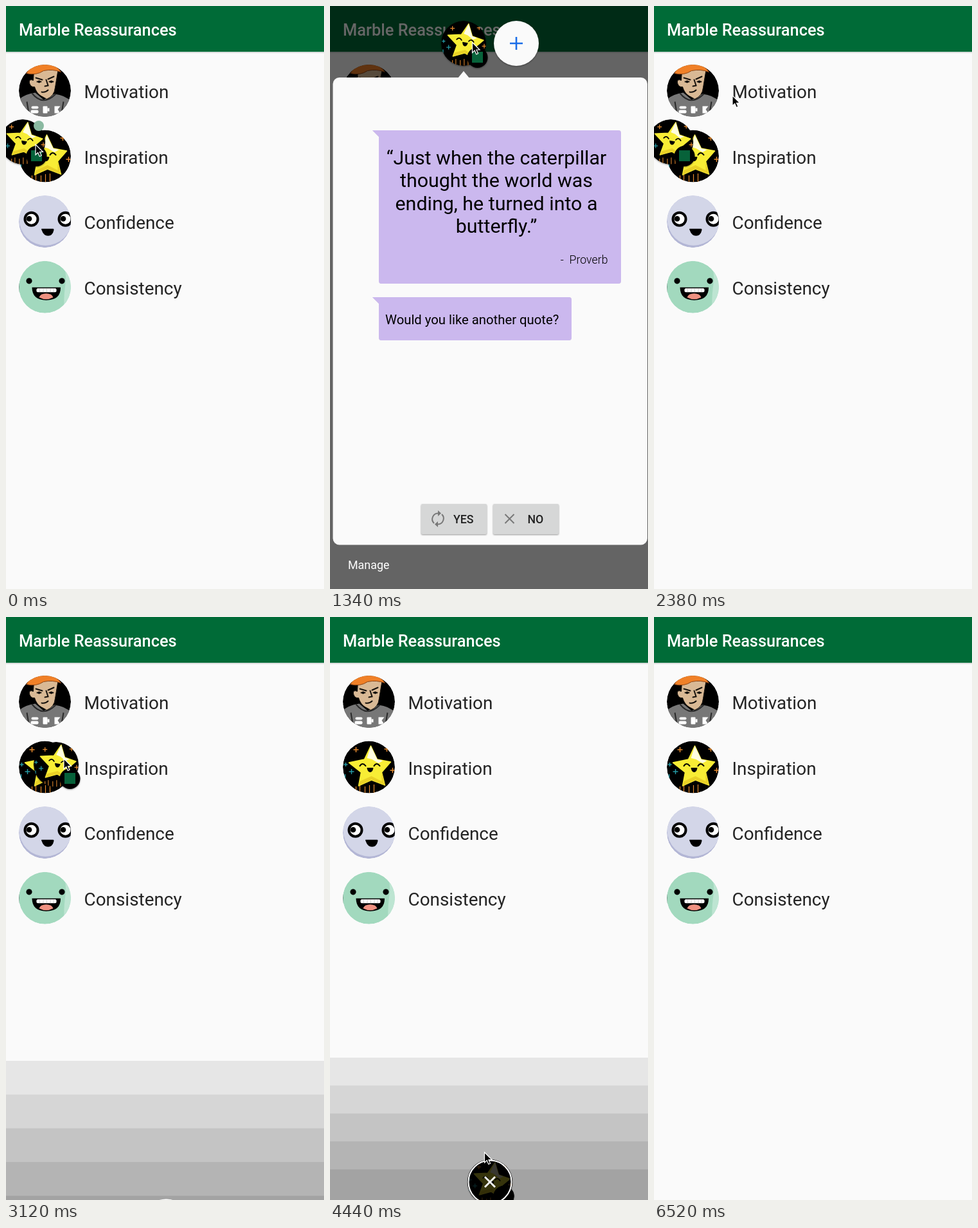
Animation of 495 by 905 pixels, one loop 7.12 s. Source, as an HTML page:

```html
<!DOCTYPE html>
<html lang="en">
<head>
<meta charset="utf-8">
<title>Quote bubbles</title>
<style>
  html, body { margin: 0; width: 100%; height: 100%; overflow: hidden; background: #fafafa; }
  svg { display: block; width: 100%; height: 100%; }
  text { font-family: Roboto, sans-serif; }
  .title { font-size: 25.4px; font-weight: 500; fill: #fff; }
  .item { font-size: 27.9px; fill: #242424; }
  .quote { font-size: 30.4px; text-anchor: middle; }
  .author { font-size: 17.75px; font-weight: 300; text-anchor: end; white-space: pre; }
  .ask { font-size: 20.3px; }
  .button { font-size: 17.75px; font-weight: 500; fill: #222; }
  .manage { font-size: 17.9px; fill: #fff; }
  .raised { filter: drop-shadow(0 1px 1px rgba(0, 0, 0, .4)); }
  .line { fill: none; stroke-width: 2; }
</style>
</head>
<body>
<svg viewBox="0 0 495 905" preserveAspectRatio="none">
  <defs>
    <clipPath id="round"><circle r="40.5"/></clipPath>

    <g id="sky">
      <circle r="40.5"/>
      <g class="line" stroke="#e58a2e" stroke-width="1.5">
        <path d="M-24-27h8m-4-4v8M24-28h8m-4-4v8M33 5h8m-4-4v8" style="stroke-width:1.5"/>
        <path d="M-20 30v8M-14 28v12M-6 30v10M1 28v12M8 27v13" style="stroke-width:1.2"/>
      </g>
      <path class="line" stroke="#259aa5" style="stroke-width:1.5" d="M-31 7h8m-4-4v8M-39-4h6m-3-3v6M-37 11v6"/>
    </g>

    <g id="star" stroke-linejoin="round">
      <path fill="#f8ed35" stroke="#f8ed35" stroke-width="1.5"
            d="M3-33 13-12 34-8 20 8 25 28 4 20-16 29-12 8-31-7-7-12Z"/>
      <path fill="#e9d126" d="M20 8 25 28 4 20-16 29-14 22 4 14 20 22Z"/>
      <path fill="#fffde0" d="M3-33 13-12 22-10 15-6 5-12-3-14Z"/>
      <path fill="none" stroke="#000" stroke-width="2" stroke-linecap="round"
            d="M-14-2q4-6 9 0M8-2q4-6 9 0"/>
      <path d="M-3 1h10q-1 7-5 7t-5-7Z"/>
    </g>

    <g id="starFace" clip-path="url(#round)"><use href="#sky"/><use href="#star"/></g>
    <g id="bubbleFace" clip-path="url(#round)">
      <use href="#sky"/><use href="#star" transform="translate(1 -3) rotate(9)"/>
    </g>

    <g id="capFace" clip-path="url(#round)">
      <circle r="40.5"/>
      <path fill="#777" d="M-41 14q10-9 26-11l13 11L15 5q17 2 26 12v25h-82Z"/>
      <path class="line" stroke="#292929" d="M-20 4Q-3 25 17 5M-28 17l4 24M29 17l-4 24"/>
      <path fill="#d9b995" stroke="#17120d" d="M-17-32-18-16q-7-3-6 4 2 7 8 6 3 10 10 14l9 5q12-5 13-18l5-30Z"/>
      <path fill="#f08027" stroke="#8a4517" d="M-29-27q9-17 27-15 20 0 27 13-13-5-27-2-12 8-27 4Z"/>
      <path class="line" stroke="#17120d" stroke-linecap="round"
            d="M-14-20l10 3M5-18l9-4M2-17l3 9-5 1M-5 2q6 1 10-3M-12-14h6M7-14h6"/>
      <circle cx="-9" cy="-14" r="2"/><circle cx="10" cy="-14" r="2"/>
      <g fill="#fff">
        <rect x="-21" y="24" width="11" height="4" rx="2"/><rect x="-22" y="30" width="12" height="5" rx="2"/>
        <rect x="-3" y="24" width="7" height="11" rx="1"/><path d="M4 27h3v5H4ZM15 24h9l-4 5 4 6h-9Z"/>
      </g>
    </g>

    <g id="moonFace" clip-path="url(#round)">
      <circle r="40.5" fill="#b3b6d5"/>
      <circle cx="1" cy="-4" r="41" fill="#d3d6e8"/>
      <g id="eye"><circle cx="-21" cy="-4" r="12"/><circle cx="-21" cy="-4" r="8" fill="#fff"/><circle cx="-24.5" cy="-4.5" r="4.3"/></g>
      <use href="#eye" x="53"/>
      <path d="M-5 11H13q1 0 1 2-2 9-9 9t-10-9q-1-2 0-2Z"/>
    </g>

    <g id="mintFace" clip-path="url(#round)">
      <circle r="40.5" fill="#a2d9be"/>
      <path fill="#bde5d2" d="M25-41Q35-25 32-5T30 41H42V-41Z"/>
      <path fill="#789f8e" d="M-41-6h1.5V8H-41Z"/>
      <circle cx="-24.500" cy="-9.500" r="4.6"/><circle cx="26.500" cy="-9.500" r="4.6"/>
      <path d="M-20 .5H24.500Q25 20 2 20.500-20 20-20 .5Z"/>
      <path fill="#ef9181" d="M-9 16q2-6 11-6t11 6q-11 6-22 0Z"/>
      <rect x="-13" y="2" width="31" height="6" rx="2" fill="#fff"/>
      <path stroke="#bbb" d="M-8 2v6M-2.500 2v6M3 2v6M8.500 2v6M13.500 2v6" stroke-width=".7"/>
    </g>
  </defs>

  <rect width="495" height="905" fill="#fafafa"/>
  <rect width="495" height="73" fill="#d9dcda"/>
  <rect width="495" height="71" fill="#006b37"/>
  <text class="title" x="20" y="45.500">Marble Reassurances</text>
  <g id="list"></g>
  <rect id="scrim" width="495" height="905"/>
  <g id="bands"></g>

  <g id="panel">
    <path fill="#fafafa" d="M199 112 208 101 217 112Z"/>
    <rect x="4.500" y="111" width="489.500" height="725.500" rx="10" fill="#fafafa"/>
    <text class="manage" x="28" y="874">Manage</text>
    <g id="content">
      <g fill="#cbb8ee" class="raised" style="filter:drop-shadow(0 .5px .5px rgba(0,0,0,.15))">
        <path d="M66 193H449q4 0 4 4V427q0 4-4 4H80q-4 0-4-4V203Z"/>
        <path d="M66 452H372q4 0 4 4V515q0 4-4 4H80q-4 0-4-4V462Z"/>
      </g>
      <g id="quote"></g>
      <text class="author" x="432.500" y="400">-  Proverb</text>
      <text class="ask" x="86" y="494">Would you like another quote?</text>
      <g fill="#d6d7d7" class="raised">
        <rect x="142" y="773" width="102" height="47" rx="2"/>
        <rect x="254" y="773" width="102" height="47" rx="2"/>
      </g>
      <g class="line" stroke="#777">
        <path d="M162 803A9 9 0 0 1 168 787.500h2M174 789A9 9 0 0 1 168 804.500h-2"/>
        <path d="M272.500 789l14 14m0-14l-14 14"/>
      </g>
      <path fill="#777" d="M168 783v9l5-4.500ZM168 800v9l-5-4.500Z"/>
      <text class="button" x="192" y="802.500">YES</text>
      <text class="button" x="307.500" y="802.500">NO</text>
    </g>
  </g>

  <g id="plus" class="raised">
    <circle r="35" fill="#fafafa"/>
    <path d="M-10 0H10M0-10V10" stroke="#1a6de8" stroke-width="2.6"/>
  </g>
  <g id="bubble">
    <g class="raised">
      <use href="#bubbleFace" transform="scale(.865)"/>
      <circle cx="21.500" cy="22" r="16"/>
    </g>
    <rect x="13" y="13" width="17" height="17" fill="#07623a"/>
    <circle id="dot" cx="25" cy="-25" r="8" fill="#8ab9a1"/>
    <g id="dim"><circle r="35" opacity=".78"/><circle cx="21.500" cy="22" r="16"/></g>
  </g>
  <g id="target" fill="none" stroke="#fff">
    <circle r="33.500" stroke-width="2"/>
    <path d="M-8-8 8 8M8-8-8 8" stroke-width="2.800"/>
  </g>
  <path id="cursor" stroke="#fff" stroke-width="1.200" d="M0 0V16L3.700 12.500 6.300 18.500 9 17.300 6.500 11.500H11.500Z"/>
</svg>

<script>
const $ = id => document.getElementById(id);
const LOOP = 7120, STEPS = 48;

$('list').innerHTML = [['cap', 'Motivation'], ['star', 'Inspiration'], ['moon', 'Confidence'], ['mint', 'Consistency']]
  .map(([face, name], i) => `<use href="#${face}Face" transform="translate(60.5 ${131.5 + 101.6 * i})"/>
    <text class="item" x="121.500" y="${143 + 101.6 * i}">${name}</text>`).join('');

$('quote').innerHTML = ['“Just when the caterpillar', 'thought the world was', 'ending, he turned into a', 'butterfly.”']
  .map((line, i) => `<text class="quote" x="259" y="${245.5 + 35.6 * i}">${line}</text>`).join('');

$('bands').innerHTML = Array.from({ length: 5 }, (_, i) =>
  `<rect width="495" fill-opacity="${.08 + .067 * i}"/>`).join('');

// Each key is [step, ...values]; values are linear between keys.
const tracks = {
  bubble: [[0, 26, 211], [1, 26, 211], [2, 66, 160], [3, 180, 72], [4, 211, 56], [5, 208, 58], [12, 208, 58],
    [13, 178, 58], [14, 80, 135], [15, 26, 205], [16, 26, 211], [19, 26, 211], [20, 38, 217], [21, 78, 229],
    [24, 146, 400], [27, 222, 643], [28, 228, 715], [29, 236, 795], [30, 249, 877]],
  plus: [[0, 26, 211], [1, 26, 211], [2, 66, 160], [3, 240, 72], [4, 296, 56], [5, 290, 58], [12, 290, 58],
    [13, 265, 58], [14, 130, 125], [15, 26, 205]],
  cursor: [[0, 46, 215], [4, 46, 215], [5, 90, 175], [7, 200, 75], [8, 222.5, 57], [9, 221.5, 56.5], [12, 221.5, 56.5],
    [13, 212, 65], [15, 150, 118], [19, 38, 202], [20, 50, 208], [21, 90, 220], [24, 158, 391], [27, 234, 634],
    [28, 238, 706], [29, 240, 780], [30, 240.5, 831], [41, 240.5, 831], [42, 290, 850], [43, 350, 868]],
  scrim: [[1, 0], [2, .15], [3, .42], [4, .6], [11, .6], [12, .4], [13, .09], [14, 0]],
  panelScale: [[3, .3], [4, .62], [5, .94], [6, 1], [11, 1], [12, .85]],
  panelFade: [[3, 0], [4, 1], [11, 1], [12, .6], [13, 0]],
  content: [[5, 0], [7, 1]],
  bands: [[19, 0], [20, .5], [21, 1], [34, 1], [35, .4], [36, 0]],
  bandLayout: [[21, 689, 52.3], [24, 684, 43.3]],
  target: [[20, 975], [21, 938], [23, 880], [24, 877]],
  dismiss: [[34, 1], [35, .4], [36, 0]]
};

function at(name, step) {
  const keys = tracks[name];
  const next = keys.findIndex(k => k[0] > step);
  if (next === 0) return keys[0].slice(1);
  if (next < 0) return keys[keys.length - 1].slice(1);
  const a = keys[next - 1], b = keys[next], u = (step - a[0]) / (b[0] - a[0]);
  return a.slice(1).map((v, i) => v + (b[i + 1] - v) * u);
}

const move = (id, x, y, scale = 1) => $(id).setAttribute('transform', `translate(${x} ${y}) scale(${scale})`);
const fade = (id, value) => $(id).setAttribute('opacity', +value);

function draw(step) {
  const [shrink] = at('dismiss', step);
  move('bubble', ...at('bubble', step), shrink);
  fade('bubble', step < 36);
  fade('dot', step < 2);
  fade('dim', step >= 30);
  move('plus', ...at('plus', step));
  fade('plus', step >= 2 && step < 15);
  move('cursor', ...at('cursor', step));
  fade('cursor', step < 44);
  fade('scrim', at('scrim', step)[0]);

  const [scale] = at('panelScale', step);
  move('panel', 215 * (1 - scale), 97 * (1 - scale), scale);
  fade('panel', at('panelFade', step)[0]);
  fade('content', at('content', step)[0]);

  const [top, gap] = at('bandLayout', step);
  [...$('bands').children].forEach((band, i) => {
    band.setAttribute('y', top + gap * i);
    band.setAttribute('height', i < 4 ? gap : 100);
  });
  fade('bands', at('bands', step)[0]);
  move('target', 249, at('target', step)[0], shrink);
  fade('target', step >= 20 && step < 36);
}

const start = performance.now();
function tick() {
  const time = (performance.now() - start) % LOOP;
  draw(Math.floor((time + 12) * STEPS / LOOP) % STEPS);
  requestAnimationFrame(tick);
}
tick();
</script>
</body>
</html>
```
